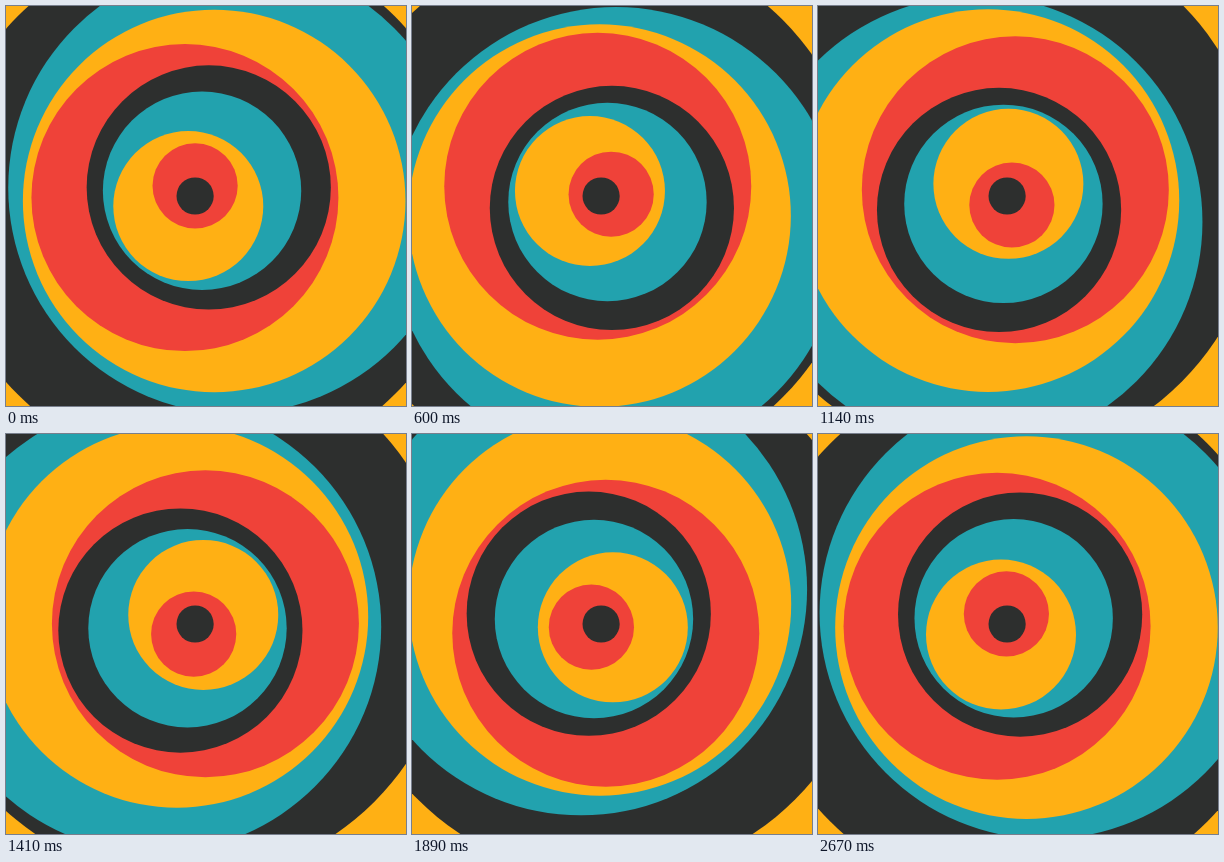
Recreate the animation shown at these times as an HTML page with a canvas. Size 400 by 400 pixels, loop 2.7 s.

```html
<!DOCTYPE html>
<html lang="en">
<head>
<meta charset="utf-8">
<title>Orbiting rings</title>
<style>
  html, body { margin: 0; width: 100%; height: 100%; overflow: hidden; background: #ffb014; }
  canvas { display: block; }
</style>
</head>
<body>
<canvas id="stage" width="400" height="400"></canvas>
<script>
const ctx = document.getElementById('stage').getContext('2d');
const PERIOD = 2700, STEP = 30;
const CENTER = { x: 189.1, y: 190 };
const YELLOW = '#ffb014', DARK = '#2d2f2e', TEAL = '#22a2ae', RED = '#ef4239';

// Outermost first: colour, radius, orbit radius, starting angle in degrees
const discs = [
  [DARK, 267, 14.5, 40],
  [TEAL, 226, 40, -12],
  [YELLOW, 191.3, 19.7, 14.5],
  [RED, 153.5, 10.3, 171],
  [DARK, 122.1, 16.1, -32],
  [TEAL, 99.2, 8.7, -37],
  [YELLOW, 75, 12.2, 124],
  [RED, 42.6, 10.2, -90],
  [DARK, 18.6, 0, 0],
];

function draw(time) {
  const turn = Math.floor((time % PERIOD) / STEP) * STEP / PERIOD * 2 * Math.PI;
  ctx.fillStyle = YELLOW;
  ctx.fillRect(0, 0, 400, 400);
  for (const [color, radius, orbit, start] of discs) {
    const angle = start * Math.PI / 180 + turn;
    ctx.fillStyle = color;
    ctx.beginPath();
    ctx.arc(CENTER.x + orbit * Math.cos(angle), CENTER.y + orbit * Math.sin(angle),
      radius, 0, 2 * Math.PI);
    ctx.fill();
  }
}

function tick() {
  draw(performance.now());
  requestAnimationFrame(tick);
}
tick();
</script>
</body>
</html>
```
